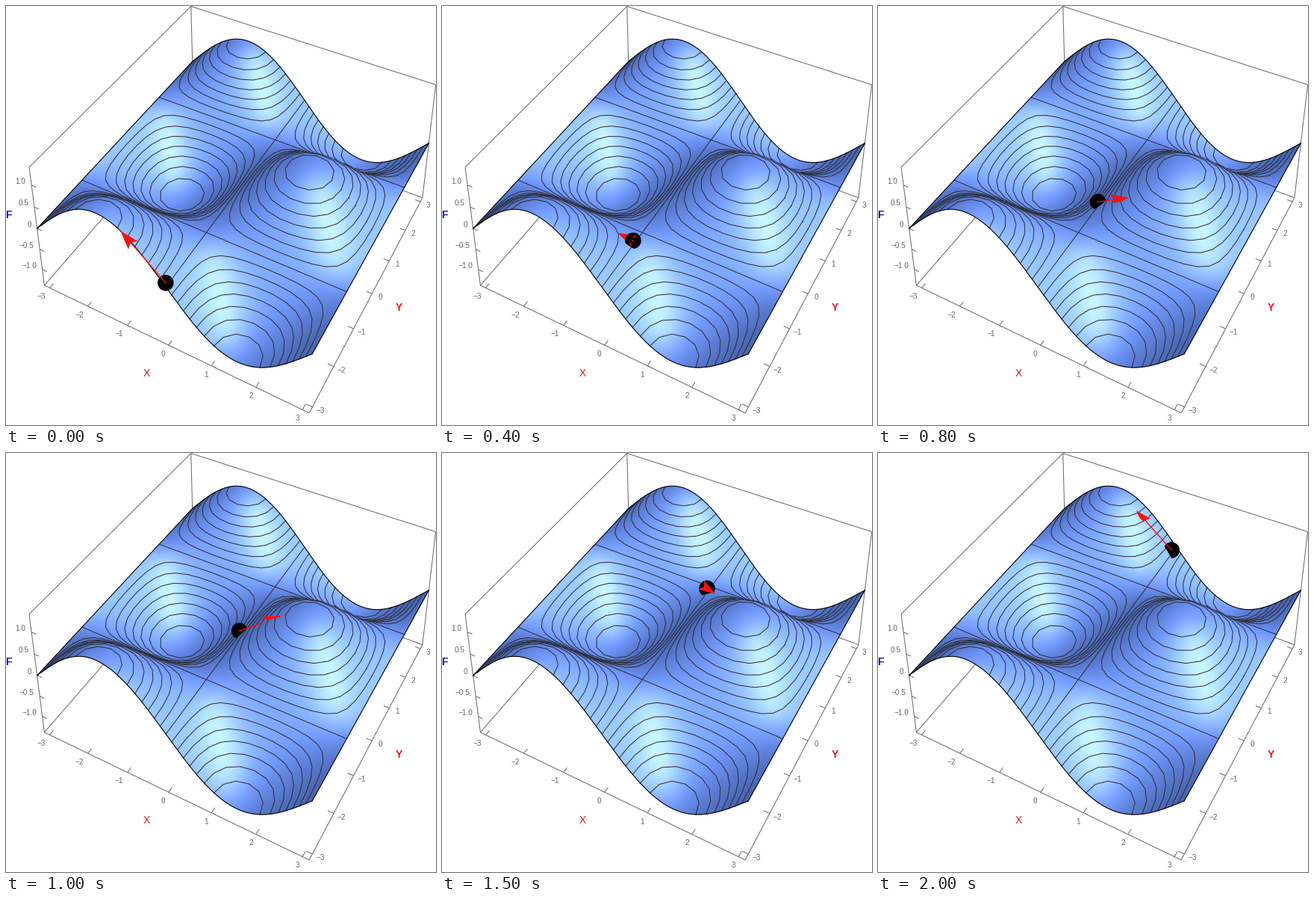
Write a matplotlib script that moves like this. It is 576 px wide and 561 px high and loops after 2100 ms.

```python
import itertools

import numpy as np
import matplotlib.pyplot as plt
from matplotlib.animation import FuncAnimation
from matplotlib.path import Path

W, H, DPI = 576, 561, 100
SS = 2                 # supersampling of the depth buffer
PI, ZMAX = np.pi, 1.4
FRAMES, STEP, LIFT = 21, 0.3, 0.1
PATCH = 80             # half size of the redrawn square around the ball
BALL_R, HEAD = 10.8, 23
GREY, INK = "#666666", "#2b2d33"


def height(x, y):
    return np.sin(x) * np.cos(y)


def ball_y(i):
    return -PI + STEP * i


# ---- camera: projection matrix fitted to known points (in half box sizes) ----
BALL_Z = LIFT / ZMAX
ANCHORS = [
    ((-1, -1, -1), (51, 374)), ((1, -1, -1), (406, 544)),
    ((1, 1, -1), (557, 256)), ((-1, -1, 1), (31, 215)),
    ((-1, 1, 1), (247, 0)), ((1, 1, 1), (575, 105)),
    ((-1, -1, 0), (41.2, 297)), ((1, -1, 0), (410, 465.5)),
    ((1, 1, 0), (566, 183.5)), ((-1, 1, 0), (249, 74)),
    ((0, ball_y(0) / PI, BALL_Z), (212.5, 370.5)),
    ((0, ball_y(10) / PI, BALL_Z), (311.5, 237.5)),
    ((0, ball_y(20) / PI, BALL_Z), (394, 129)),
]


def fit_camera():
    world = np.array([np.append(np.array(c) * (PI, PI, ZMAX), 1)
                      for c, _ in ANCHORS])
    pixels = (np.array([p for _, p in ANCHORS]) + 0.5) / 100
    depth = np.ones(len(world))
    for _ in range(6):      # weights turn the residual into pixel distance
        rows, rhs = [], []
        for p, (u, v), w in zip(world, pixels, depth):
            rows += [np.r_[p, np.zeros(4), -u * p[:3]] / w,
                     np.r_[np.zeros(4), p, -v * p[:3]] / w]
            rhs += [u / w, v / w]
        sol = np.linalg.lstsq(np.array(rows), np.array(rhs), rcond=None)[0]
        cam = np.append(sol, 1).reshape(3, 4)
        depth = world @ cam[2]
    cam[:2] *= 100
    return cam / np.linalg.norm(cam[2, :3])


CAM = fit_camera()


def project(x, y, z):
    """Pixel position and depth of world points."""
    a, b, w = (r[0] * x + r[1] * y + r[2] * z + r[3] for r in CAM)
    return a / w, b / w, w


# ---- surface: depth buffer and shading ----
def shade(x, y):
    nx = -0.9 * np.cos(x) * np.cos(y)
    ny = 0.9 * np.sin(x) * np.sin(y)
    norm = np.sqrt(nx**2 + ny**2 + 1)
    nx, ny, nz = nx / norm, ny / norm, 1 / norm
    half = np.array([0.42, -0.42, 0.80])
    half /= np.linalg.norm(half)
    glow = np.clip(nx * half[0] + ny * half[1] + nz * half[2], 0, 1) ** 16
    rgb = [110 + 54 * nx - 15 * ny + 66 * glow,
           148 + 68 * nx - 20 * ny + 68 * glow,
           246 + 100 * nx - 28 * ny + 40 * glow]
    return np.clip(np.stack(rgb, -1), 0, 255) / 255


def shrink(rgba):
    """Average SS x SS blocks of a supersampled RGBA picture."""
    h, w = rgba.shape[:2]
    pre = rgba.copy()
    pre[..., :3] *= pre[..., 3:]
    out = pre.reshape(h // SS, SS, w // SS, SS, 4).mean((1, 3))
    out[..., :3] /= np.maximum(out[..., 3:], 1e-6)
    return np.clip(out, 0, 1)


def buffer_cell(u, v):
    return (np.clip((v * SS).astype(int), 0, H * SS - 1),
            np.clip((u * SS).astype(int), 0, W * SS - 1))


def render_surface(n=2400):
    axis = np.linspace(-PI, PI, n)
    x, y = (g.ravel() for g in np.meshgrid(axis, axis))
    u, v, w = project(x, y, height(x, y))
    row, col = buffer_cell(u, v)
    order = np.argsort(-w)
    nearest = np.full(W * H * SS * SS, -1)
    nearest[(row * W * SS + col)[order]] = order
    hit = nearest >= 0
    depth = np.full(nearest.shape, np.inf)
    depth[hit] = w[nearest[hit]]
    rgba = np.zeros((nearest.size, 4))
    rgba[hit, :3] = shade(x[nearest[hit]], y[nearest[hit]])
    rgba[hit, 3] = 1
    return depth.reshape(H * SS, W * SS), shrink(rgba.reshape(H * SS, W * SS, 4))


DEPTH, SURFACE = render_surface()

fig = plt.figure(figsize=(W / DPI, H / DPI), dpi=DPI, facecolor="white")
ax = fig.add_axes([0, 0, 1, 1])
ax.imshow(SURFACE, extent=(0, W, H, 0), aspect="auto",
          interpolation="nearest", zorder=2)
ax.set_xlim(0, W)
ax.set_ylim(H, 0)
ax.axis("off")


def px(pixels):
    return pixels * 72 / DPI


def on_surface(x, y, z, color=INK, width=1):
    """Draw a polyline, leaving out what the surface hides."""
    n = len(x)
    t = np.linspace(0, n - 1, (n - 1) * 10 + 1)
    u, v, w = project(*(np.interp(t, np.arange(n), c) for c in (x, y, z)))
    u = np.where(w < DEPTH[buffer_cell(u, v)] + 0.25, u, np.nan)
    ax.plot(u, v, color=color, lw=px(width), zorder=3)


def contour(x0, y0, level):
    """Curve cos(u) cos(v) = level around an extremum of the surface."""
    count = int(36 - 28 * level)
    start, end = {-1: (0, PI), 0: (0, 2 * PI), 1: (PI, 2 * PI)}[round(y0 / PI)]
    if y0:
        count = count // 2 + 1
    t = np.linspace(start, end, count + 1)
    c, s = np.cos(t), np.sin(t)
    u = np.sign(c) * np.arccos(np.minimum(level ** c**2, 1))
    v = np.sign(s) * np.arccos(np.minimum(level ** s**2, 1))
    z = np.full(t.shape, level * np.sign(height(x0, y0)))
    on_surface(x0 + u, np.clip(y0 + v, -PI, PI), z)


for x0, y0 in itertools.product((-PI / 2, PI / 2), (-PI, 0, PI)):
    for level in np.arange(1, 8) / 8:
        contour(x0, y0, level)

span = np.linspace(-PI, PI, 61)
flat = np.zeros_like(span)
on_surface(flat, span, flat)
for y0 in (-PI / 2, PI / 2):
    on_surface(span, flat + y0, flat)
for side in (-PI, PI):
    on_surface(span, flat + side, height(span, side), "black", 1.1)
    on_surface(flat + side, span, flat, "black", 1.1)


# ---- box, ticks and labels ----
def segment(p, q):
    u, v, _ = project(*np.array([p, q], float).T)
    ax.plot(u, v, color=GREY, lw=px(1), zorder=1, solid_capstyle="butt")


def label(x, y, text, size, color, **style):
    ax.text(x, y, text, color=color, fontsize=px(size),
            va="center_baseline", family="Liberation Sans", **style)


def tick(point, inward, text, dx, dy, ha="center"):
    point = np.array(point, float)
    segment(point, point + inward)
    u, v, _ = project(*point)
    label(u + dx, v + dy, text.replace("-", "\u2212"), 10, GREY, ha=ha)


corners = list(itertools.product((-1, 1), repeat=3))
for p, q in itertools.combinations(corners, 2):
    near = (1, -1, 1)
    if sum(a != b for a, b in zip(p, q)) == 1 and near not in (p, q):
        segment(np.array(p) * (PI, PI, ZMAX), np.array(q) * (PI, PI, ZMAX))

for k in range(-3, 4):
    tick((k, -PI, -ZMAX), (0, 0.13, 0), str(k), -7 - 4 * (k < 0), 10.7)
    tick((PI, k, -ZMAX), (-0.13, 0, 0), str(k), 10.7, 4)
for z in (-1, -0.5, 0, 0.5, 1):
    tick((-PI, -PI, z), (0.12, 0, 0), f"{z:.1f}" if z else "0", -7.5, -6, "right")

label(188, 490, "X", 14, "#e81a1e", ha="center")
label(526.3, 402, "Y", 14, "#e81a1e", ha="center", weight="bold")
label(3.5, 278.5, "F", 14, "#1414c8", ha="center", weight="bold")

# ---- ball and slope arrow ----
overlay = ax.imshow(np.zeros((2 * PATCH, 2 * PATCH, 4)), aspect="auto",
                    extent=(0, 1, 1, 0), interpolation="nearest", zorder=4)
ax.set_xlim(0, W)
ax.set_ylim(H, 0)
W_MID = project(0, 0, 0)[2]


def draw(i):
    y = ball_y(i)
    slope = np.cos(y)
    bu, bv, bw = project(0, y, LIFT)
    tu, tv, tw = project(slope, y, height(slope, y))
    left, top = int(bu) - PATCH, int(bv) - PATCH
    size = 2 * PATCH * SS
    grid = (np.arange(size) + 0.5) / SS
    u, v = np.meshgrid(grid + left, grid + top)
    depth = DEPTH[top * SS:top * SS + size, left * SS:left * SS + size]

    ball = (np.hypot(u - bu, v - bv) < BALL_R) & (bw < depth)

    # along / across: pixel coordinates on the arrow's own axis
    length = np.hypot(tu - bu, tv - bv)
    ex, ey = (tu - bu) / length, (tv - bv) / length
    along = (u - bu) * ex + (v - bv) * ey
    across = (v - bv) * ex - (u - bu) * ey
    head = HEAD * W_MID / tw
    shape = Path(np.array([(0, 0), (-1, 0.32), (-0.8, 0), (-1, -0.32), (0, 0)])
                 * head + (length, 0))
    red = shape.contains_points(np.c_[along.ravel(), across.ravel()])
    red = red.reshape(u.shape)
    red |= (np.abs(across) < 0.7) & (along > -0.7) & (along < length - 0.7 * head)
    w = bw + np.clip(along / length, 0, 1) * (tw - bw)
    red &= (w < depth + 0.06) & ~(ball & (w > bw + 0.01))

    rgba = np.zeros((size, size, 4))
    rgba[ball, 3] = 1
    rgba[red] = (1, 0.06, 0.06, 1)
    overlay.set_data(shrink(rgba))
    overlay.set_extent((left, left + 2 * PATCH, top + 2 * PATCH, top))
    return [overlay]


anim = FuncAnimation(fig, draw, frames=FRAMES, interval=100, repeat=True)
plt.show()
```
